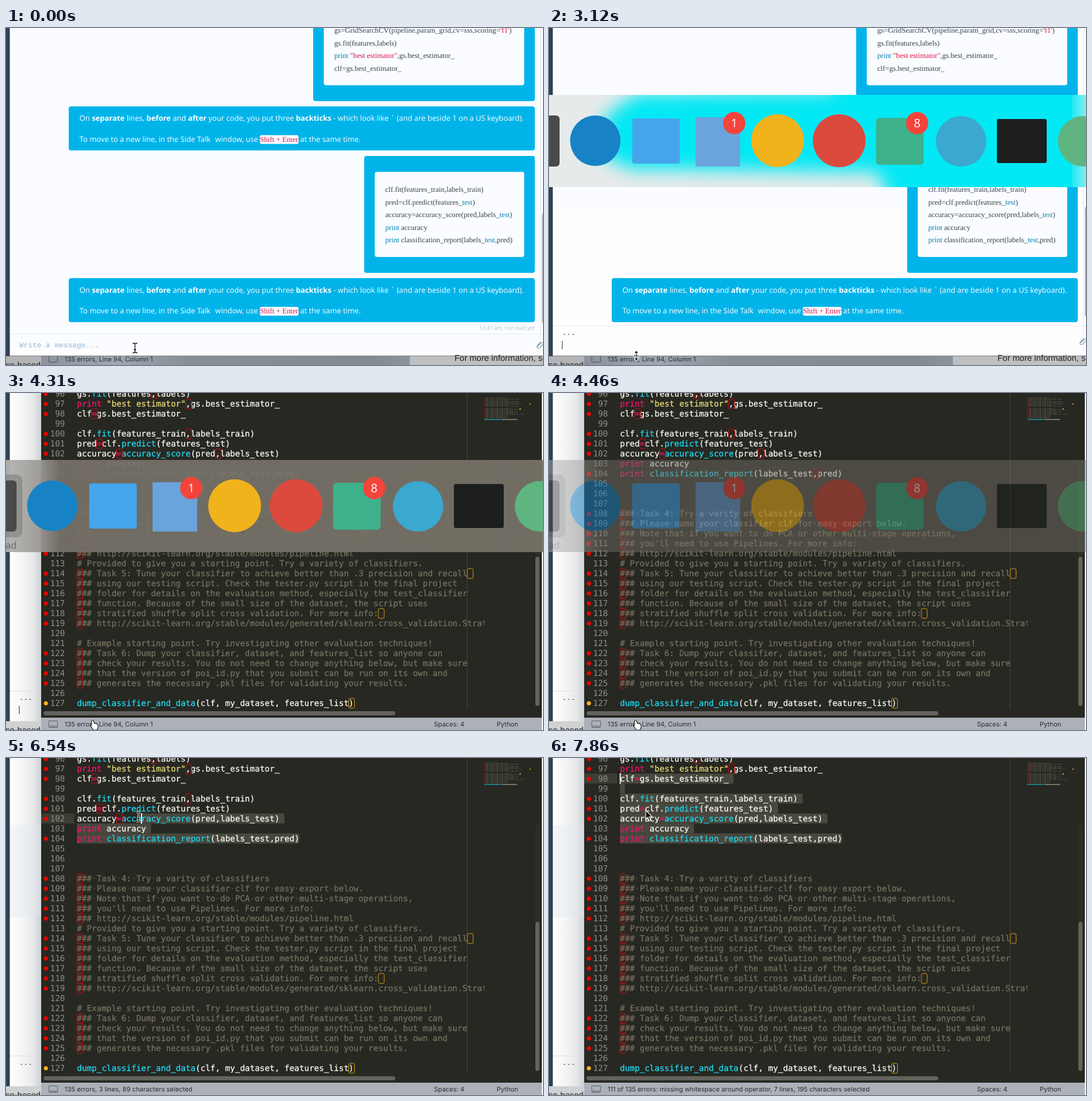
Animation of 916 by 574 pixels, one loop 8000 ms. Source, as an HTML page:

```html
<!DOCTYPE html>
<html lang="en">
<head>
<meta charset="utf-8">
<title>Chat and editor</title>
<style>
  html, body { margin: 0; width: 100%; height: 100%; overflow: hidden; background: #fafcff; }
  svg { display: block; width: 916px; height: 574px; }
  text { white-space: pre; text-rendering: geometricPrecision; }
  .sans { font: 12.75px "Open Sans", sans-serif; fill: #fff; }
  .serif { font: 12.6px "Liberation Serif", serif; fill: #36434d; }
  .input { font: bold 12.6px "Liberation Mono", monospace; }
  .code { font: 14px "DejaVu Sans Mono", monospace; fill: #f8f8f2; }
  .code tspan { stroke-width: .3px; }
  .ui { font: 11px Inter, sans-serif; fill: #2b2e33; }
  .page { font: 14.5px "Liberation Sans", sans-serif; fill: #222; }
  .badge { font: 20px "Open Sans", sans-serif; fill: #fff; text-anchor: middle; }
</style>
</head>
<body>
<svg id="stage" viewBox="0 0 916 574">
  <defs>
    <linearGradient id="strip"><stop offset="0" stop-color="#fff"/><stop offset=".4" stop-color="#f4f5f6"/><stop offset=".75" stop-color="#e6e8e9"/><stop offset="1" stop-color="#cdd1d3"/></linearGradient>
    <linearGradient id="dusk"><stop offset="0" stop-color="#b3b3b1"/><stop offset=".06" stop-color="#9d9c98"/><stop offset=".1" stop-color="#746f66"/><stop offset="1" stop-color="#767167"/></linearGradient>
    <linearGradient id="bar"><stop offset="0" stop-color="#8d929b"/><stop offset=".2" stop-color="#a0a8b3"/><stop offset=".4" stop-color="#898e95"/><stop offset=".9" stop-color="#868a91"/><stop offset="1" stop-color="#8d949d"/></linearGradient>
    <filter id="soft" x="-20%" y="-20%" width="140%" height="140%"><feGaussianBlur stdDeviation="15"/></filter>
    <clipPath id="codeClip"><path d="M60 0H816V553H60z"/></clipPath>
    <clipPath id="panelClip"><path d="M0 114H916V271H0z"/></clipPath>
  </defs>
</svg>
<script>
const NS = 'http://www.w3.org/2000/svg';
const stage = document.getElementById('stage');

function add(parent, tag, attrs = {}, text) {
  const node = document.createElementNS(NS, tag);
  for (const k in attrs) node.setAttribute(k, attrs[k]);
  if (text !== undefined) node.textContent = text;
  return parent.appendChild(node);
}
const group = (parent, attrs) => add(parent, 'g', attrs);
const rect = (parent, x, y, width, height, fill, rx = 0, more) =>
  add(parent, 'rect', { x, y, width, height, fill, rx, ...more });
const circle = (parent, cx, cy, r, fill) => add(parent, 'circle', { cx, cy, r, fill });
const label = (parent, cls, x, y, text, more) =>
  add(parent, 'text', { class: cls, x, y, ...more }, text);
const show = (node, on) => node.setAttribute('visibility', on ? 'inherit' : 'hidden');

// Text split by a pattern; style(part) gives the attributes of each run.
function rich(parent, cls, x, y, text, pattern, style) {
  const node = label(parent, cls, x, y, '');
  for (const part of text.split(pattern)) {
    if (!part) continue;
    const look = style(part);
    add(node, 'tspan', look, look['font-weight'] ? part.slice(1, -1) : part);
  }
}

/* ---------- chat window ---------- */
const BLUE = '#00b4ea', PAPER = '#fafcff';
const chat = group(stage);
rect(chat, 0, 0, 916, 574, PAPER);
const grown = rect(chat, 7, 305, 904, 254, '#fefeff');
rect(chat, 911, 0, 1, 559, '#e3e8ec');
const thumb = rect(chat, 914, 316, 2, 186, '#b4b8bb', 1);

function snippet(x, top, bottom, lines, base) {
  rect(chat, x, top, 902 - x, bottom - top, BLUE, 4);
  rect(chat, x + 18, top + 27, 866 - x, bottom - top - 54, PAPER, 4);
  lines.forEach((line, i) =>
    rich(chat, 'serif', x + 36, base + i * 21.6, line, /(print|(?<=_)test|"[^"]*"|'[^']*')/, part =>
      /^["']/.test(part) ? { fill: '#df0f45' } : /^(print|test)$/.test(part) ? { fill: '#0080b0' } : {}));
}

function advice(top) {
  rect(chat, 107, top, 795, 75, BLUE, 4);
  rich(chat, 'sans', 125.3, top + 24.5,
    'On *separate* lines, *before* and *after* your code, you put three *backticks* - which look like ` (and are beside 1 on a US keyboard).',
    /(\*\w+\*)/, part => part[0] === '*' ? { 'font-weight': 700 } : {});
  const y = top + 60;
  label(chat, 'sans', 125.3, y, 'To move to a new line, in the Side Talk');
  label(chat, 'sans', 430, y, 'window, use', { 'text-anchor': 'end' });
  rect(chat, 433, y - 11, 66, 15, PAPER, 3);
  label(chat, 'serif', 433.3, y, 'Shift + Enter', { style: 'fill:#df0f45' });
  label(chat, 'sans', 501.8, y, 'at the same time.');
}

snippet(524, -80, 124.5, [
  "gs=GridSearchCV(pipeline,param_grid,cv=sss,scoring='f1')",
  'gs.fit(features,labels)',
  'print "best estimator",gs.best_estimator_',
  'clf=gs.best_estimator_'], 8);
advice(133.5);
snippet(611, 218, 417, [
  'clf.fit(features_train,labels_train)',
  'pred=clf.predict(features_test)',
  'accuracy=accuracy_score(pred,labels_test)',
  'print accuracy',
  'print classification_report(labels_test,pred)'], 279);
advice(426);
const receipt = label(chat, 'sans', 902, 514, '', { 'text-anchor': 'end', style: 'font-size:9.1px;fill:#b2bdc6' });

const divider = rect(chat, 7, 521, 909, 1, '#e6edf1');
const clip = add(chat, 'path', {
  d: 'M-3 3l6-6q2-1 3 0q1 2 0 3l-6 6q-3 1-4-1q-1-2 1-4l5-5', fill: 'none', stroke: '#7f9db3', 'stroke-width': 1.2 });
const hint = label(chat, 'input', 22.5, 543.5, 'Write a message...', { fill: '#b3cbdc' });

// strip of windows below the chat
rect(chat, 0, 559, 60, 15, '#b3b4b5');
rect(chat, 60, 559, 629, 15, 'url(#bar)');
rect(chat, 689, 559, 227, 15, '#bfc0c1');
rect(chat, 73, 556, 15, 13, 'none', 1, { stroke: '#4b4f55' });
rect(chat, 7, 550, 909, 8, '#fefeff');
rect(chat, 0, 558, 916, 1, '#7c7f82');
label(chat, 'ui', 100, 568, '135 errors, Line 94, Column 1');
label(chat, 'page', 765, 567, 'For more information, see');
label(chat, 'page', -4, 579, 'ise-based');

/* ---------- code editor ---------- */
const CW = 8.428, LEFT = 121;
const rowY = n => 528 - (127 - n) * 17;
const colX = c => LEFT + c * CW;

const editor = group(stage);
rect(editor, 0, 0, 916, 574, '#fdfdfd');
rect(editor, 6, 0, 54, 559, 'url(#strip)');
rect(editor, 6, 114, 54, 157, '#dfe5ee', 0, { opacity: .35 });
rect(editor, 6, 507, 54, 1, '#dde3e7');
rect(editor, 0, 559, 60, 15, '#cfd1d2');
label(editor, 'page', -4, 579, 'ise-based');
rect(editor, 60, 0, 854, 553, '#272822');
rect(editor, 60, 553, 854, 21, '#acb1b9');
rect(editor, 786, 0, 1, 538, '#45453b');
rect(editor, 903, 114, 7, 166, '#2d2e28', 3);
rect(editor, 903, 279, 7, 254, '#62635d', 3.5);
rect(editor, 64, 542, 600, 7, '#62635d', 3.5);
const marks = group(editor);

const source = `gs.fit(features,labels)
print "best estimator",gs.best_estimator_
clf=gs.best_estimator_

clf.fit(features_train,labels_train)
pred=clf.predict(features_test)
accuracy=accuracy_score(pred,labels_test)
print accuracy
print classification_report(labels_test,pred)



### Task 4: Try a varity of classifiers
### Please name your classifier clf for easy export below.
### Note that if you want to do PCA or other multi-stage operations,
### you'll need to use Pipelines. For more info:
### http://scikit-learn.org/stable/modules/pipeline.html
# Provided to give you a starting point. Try a variety of classifiers.
### Task 5: Tune your classifier to achieve better than .3 precision and recall
### using our testing script. Check the tester.py script in the final project
### folder for details on the evaluation method, especially the test_classifier
### function. Because of the small size of the dataset, the script uses
### stratified shuffle split cross validation. For more info:
### http://scikit-learn.org/stable/modules/generated/sklearn.cross_validation.StratifiedShuffleSplit.html

# Example starting point. Try investigating other evaluation techniques!
### Task 6: Dump your classifier, dataset, and features_list so anyone can
### check your results. You do not need to change anything below, but make sure
### that the version of poi_id.py that you submit can be run on its own and
### generates the necessary .pkl files for validating your results.

dump_classifier_and_data(clf, my_dataset, features_list)`.split('\n');
const FIRST = 96;
const lineLength = n => source[n - FIRST].length;

const tint = part =>
  part[0] === '#' ? '#75715e' :
  part[0] === '"' ? '#e6db74' :
  /^(print|=)$/.test(part) ? '#f4126d' :
  /^(fit|predict|accuracy_score|classification_report|dump_\w+)$/.test(part) ? '#1fd8f0' : '#f8f8f2';

const listing = group(editor, { 'clip-path': 'url(#codeClip)' });
const faults = [];
function fault(n, c, stroke = '#d40b0b') {
  const node = rect(editor, colX(c), rowY(n) - 8, 10, 17, 'none', 3, { stroke });
  faults.push({ node, at: n * 100 + c });
}

source.forEach((line, i) => {
  const n = FIRST + i, y = rowY(n) + 5;
  label(listing, 'code', 100.5, y, n, { 'text-anchor': 'end', style: 'fill:#8f908a' });
  rich(listing, 'code', LEFT, y, line,
    /(^#.*|"[^"]*"|print|=|\b(?:fit|predict|accuracy_score|classification_report|dump_\w+)(?=\())/,
    part => ({ fill: tint(part), stroke: tint(part) }));
  if (n === 103 || n === 104 || n > 107 && n < 111)
    label(listing, 'code', LEFT, y, line.replace(/./g, ch => ch === ' ' ? '·' : ' '), { style: 'fill:#59574a' });

  if (n === 127) circle(editor, 68, rowY(n) + .5, 3.5, '#f5b61d');
  else if (line && n !== 103 && !line.startsWith('# ')) circle(editor, 68, rowY(n) + .5, 3.5, '#ee0000');

  if (line.startsWith('###')) fault(n, 0);
  else if (n < 105)
    for (const m of line.matchAll(/[=,]/g)) fault(n, m.index);
});
for (const n of [114, 118]) fault(n, lineLength(n), '#dc9a12');
fault(127, 55, '#dc9a12');

const caret = rect(editor, 0, 0, 2, 18, '#f8f8f0');

rect(editor, 73, 558.5, 15, 11, 'none', 1, { stroke: '#5b6068' });
rect(editor, 74, 566, 13, 3, '#8d929a');
const status = label(editor, 'ui', 100, 568, '');
label(editor, 'ui', 730, 568, 'Spaces: 4');
label(editor, 'ui', 837, 568, 'Python');

// overview of the file
let seed = 7;
const rnd = () => (seed = seed * 16807 % 2147483647) / 2147483647;
for (let y = 6; y < 44; y += 2) {
  if (rnd() < .12) continue;
  rect(editor, 816, y, 2, 1.2, '#a01614');
  const w = 20 + rnd() * 50;
  add(editor, 'path', { d: `M819 ${y + .5}h${w}`, stroke: '#6b6756', 'stroke-dasharray': '4 1.5 2 1', opacity: .7 });
}
rect(editor, 893, 18, 2, 2, '#e0a020');
rect(editor, 876, 26, 2, 2, '#e0a020');
rect(editor, 816, 44.5, 28, 1.2, '#1fb4c8');
rect(editor, 845, 44.5, 27, 1.2, '#a5a59d');

/* ---------- shared parts ---------- */
rect(stage, 0, 0, 6.5, 559, '#2f4154');
const draft = label(stage, 'input', 22.5, 0, '', { fill: '#333' });
const inputCaret = rect(stage, 22, 533, 1, 14, '#333');

/* ---------- application switcher ---------- */
const panel = group(stage, { 'clip-path': 'url(#panelClip)' });
const cyan = group(panel);
rect(cyan, 0, 114, 916, 157, '#02e8f4');
add(cyan, 'path', { d: 'M-60 50H520L480 108 150 112 95 150V220L140 240 560 246 610 350H-60z', fill: '#e6eaea', filter: 'url(#soft)' });
add(cyan, 'path', { d: 'M905 50H970V350H905z', fill: '#a8eef2', filter: 'url(#soft)' });
const dusk = rect(panel, 0, 114, 916, 157, 'url(#dusk)', 0, { 'fill-opacity': .95 });

const picked = group(panel);
rect(picked, -80, 139, 108, 107, '#777', 10, { opacity: .5 });
label(picked, 'sans', 18, 265, 'pad', { 'text-anchor': 'end', style: 'font-size:16px;fill:#5f6265' });
rect(panel, -70, 149, 88, 87, '#4a4a4a', 6);
circle(panel, 79, 192, 43, '#1783c6');
rect(panel, 142, 154, 81, 77, '#45a5ec', 4);
rect(panel, 250, 152, 76, 84, '#6ba3dc', 2);
circle(panel, 390, 192, 45, '#f0b31c');
circle(panel, 495, 192, 45, '#dc4a3e');
rect(panel, 558, 153, 81, 80, '#3eb18a', 6);
circle(panel, 703, 193, 43, '#3ba8cf');
rect(panel, 764, 155, 85, 75, '#1c1f1e', 3);
circle(panel, 911, 193, 43, '#5fb57f');
for (const [x, n] of [[316, 1], [628, 8]]) {
  circle(panel, x, 162, 19, '#f4443c');
  label(panel, 'badge', x, 169, n);
}

/* ---------- pointers ---------- */
const pointer = group(stage);
const pointers = { beam: group(pointer), size: group(pointer), hand: group(pointer), arrow: group(pointer) };
const beam = 'M-4-8H-2Q0-8 0-6V6Q0 8-2 8H-4M4-8H2Q0-8 0-6M0 6Q0 8 2 8H4M-2 3H2';
add(pointers.beam, 'path', { d: beam, fill: 'none', stroke: '#fff', 'stroke-width': 3 });
add(pointers.beam, 'path', { d: beam, fill: 'none', stroke: '#111', 'stroke-width': 1.3 });
const solid = (name, d, fill, stroke) => add(pointers[name], 'path', { d, fill, stroke, 'stroke-width': 1.1 });
solid('size', 'M0-9L4-4H1V-1H5V1H1V4H4L0 9L-4 4H-1V1H-5V-1H-1V-4H-4z', '#111', '#fff');
solid('hand', 'M-4-6Q-3-9-1-7L1-2Q2-4 3-2Q5-3 5-1Q7-1 7 1V5L5 9H-1L-5 3Q-7 0-4 1z', '#fff', '#111');
solid('arrow', 'M0 0V15L3.5 12 6 18 8.5 17 6 11H11z', '#111', '#fff');

/* ---------- timeline: each step changes part of the state ---------- */
const at = (x, y) => ({ x, y });
const drag = (line, col, x, y) => ({ x, y, sel: [line, col, 104, 45], caret: [line, col], blink: true, note: '135 errors' });
const steps = [
  [0, { ...at(220, 545), cur: 'beam', ticks: 0, read: false, tall: false, inCaret: false, panel: 0, picked: false,
        code: false, sel: null, caret: null, blink: false, note: '135 errors' }],
  [300, { ...at(222, 545), inCaret: true }],
  [440, at(224, 545)],
  [890, { ...at(149, 558), cur: 'size', inCaret: false }],
  [1480, { ticks: 1 }],
  [1780, { ticks: 2 }],
  [1930, { ticks: 3, read: true }],
  [2520, { tall: true, inCaret: true }],
  [3120, { panel: 1 }],
  [3270, { ...at(150, 565), cur: 'hand' }],
  [3720, { picked: true }],
  [3870, { inCaret: false }],
  [4310, { code: true, inCaret: true }],
  [4460, { panel: .5, inCaret: false }],
  [4610, { ...at(190, 500), panel: 0, cur: 'beam' }],
  [4760, at(290, 340)],
  [4910, { ...at(360, 240), sel: [110, 28, 110, 29], caret: [110, 29], blink: true,
           note: "120 of 135 errors: too many leading '#' for block comment" }],
  [5060, at(368, 236)],
  [5210, at(420, 200)],
  [5360, at(462, 161)],
  [5510, at(488, 152)],
  [5660, at(502, 149)],
  [5800, { ...at(506, 148), blink: false }],
  [6090, drag(104, 45, 504, 139)],
  [6240, drag(104, 31, 384, 134)],
  [6390, drag(103, 14, 290, 118)],
  [6540, drag(102, 13, 226, 100)],
  [6690, drag(101, 8, 187, 83)],
  [6840, drag(100, 3, 147, 64)],
  [6990, drag(98, 1, 128, 38)],
  [7130, { ...drag(98, 0, 104, 34), note: '111 of 135 errors: missing whitespace around operator' }],
  [7280, { ...at(98, 36), cur: 'arrow' }],
  [7430, { ...at(108, 50), blink: false }],
  [7570, at(132, 70)],
  [7720, at(154, 84)],
  [7860, { ...at(165, 89), blink: true }],
];
let last = {};
const states = steps.map(([, patch]) => last = { ...last, ...patch });

function selection([l1, c1, l2, c2]) {
  let chars = l2 - l1;
  for (let n = l1; n <= l2; n++) {
    const from = n === l1 ? c1 : 0, to = n === l2 ? c2 : lineLength(n);
    chars += to - from;
    const width = (to - from + (n < l2 ? 1 : 0)) * CW;
    rect(marks, colX(from), rowY(n) - 8.5, width, 17, '#49483e', 2);
  }
  return chars;
}

function statusText(s, chars) {
  if (!s.sel) return s.note + ', Line 94, Column 1';
  if (!chars) return `${s.note}, Line ${s.caret[0]}, Column ${s.caret[1] + 1}`;
  const rows = s.sel[2] - s.sel[0] + 1;
  return `${s.note}, ${rows > 1 ? rows + ' lines, ' : ''}${chars} characters selected`;
}

function paint(s) {
  show(chat, !s.code);
  show(editor, s.code);
  show(hint, !s.ticks);
  show(grown, s.tall);
  show(receipt, !s.tall);
  receipt.textContent = '12:41 am, ' + (s.read ? 'read' : 'not read yet');
  thumb.setAttribute('y', s.tall ? 305 : 316);
  divider.setAttribute('y', s.tall ? 507 : 521);
  clip.setAttribute('transform', `translate(910 ${s.tall ? 533 : 539})`);
  draft.textContent = '`'.repeat(s.ticks);
  draft.setAttribute('y', s.tall ? 530 : 543.5);
  show(inputCaret, s.inCaret);

  show(panel, s.panel > 0);
  panel.setAttribute('opacity', s.panel);
  show(cyan, !s.code);
  show(dusk, s.code);
  show(picked, s.picked);

  marks.replaceChildren();
  let chars = 0;
  if (s.sel) {
    rect(marks, 60, rowY(s.caret[0]) - 8.5, 56, 17, '#3e3d32');
    chars = selection(s.sel);
    caret.setAttribute('x', colX(s.caret[1]) - .5);
    caret.setAttribute('y', rowY(s.caret[0]) - 9);
  }
  const [l1, c1, l2, c2] = s.sel || [0, 0, 0, 0];
  for (const f of faults) show(f.node, f.at < l1 * 100 + c1 || f.at >= l2 * 100 + c2);
  show(caret, s.blink);
  status.textContent = statusText(s, chars);

  for (const name in pointers) show(pointers[name], name === s.cur);
  pointer.setAttribute('transform', `translate(${s.x} ${s.y})`);
}

const LOOP = 8000;
let shown = -1;
function tick() {
  const t = performance.now() % LOOP;
  const i = steps.findLastIndex(step => step[0] <= t);
  if (i !== shown) paint(states[shown = i]);
  requestAnimationFrame(tick);
}
tick();
</script>
</body>
</html>
```
